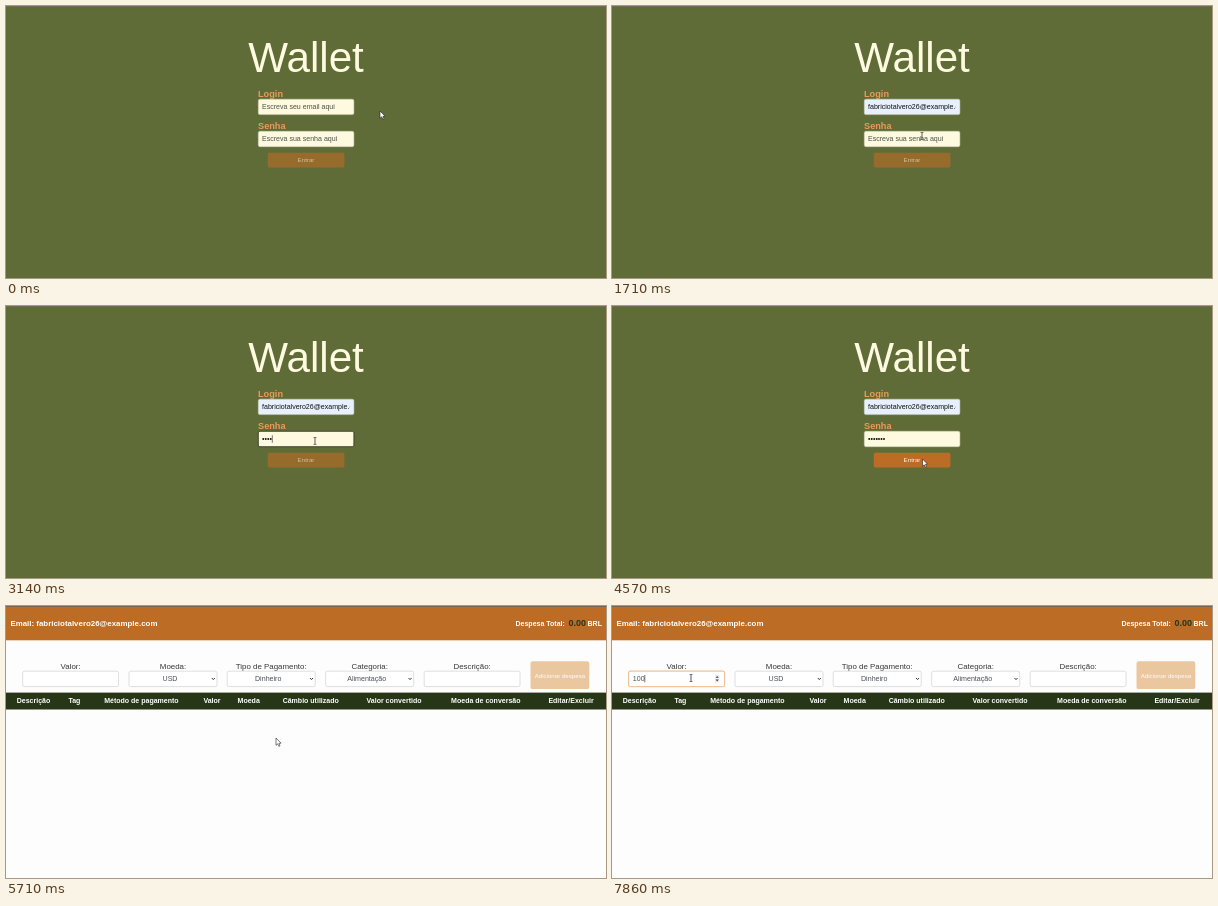
An HTML page with a canvas that plays this animation: 600 by 272 pixels, repeating every 8000 ms.

```html
<!DOCTYPE html>
<html lang="pt-BR">
<head>
<meta charset="utf-8">
<title>Wallet</title>
<style>
  html, body { margin: 0; width: 100%; height: 100%; overflow: hidden; background: #606c38; }
  canvas { display: block; width: 600px; height: 272px; }
</style>
</head>
<body>
<canvas id="stage"></canvas>
<script>
const W = 600, H = 272, LOOP = 8000, FPS = 7;
const EMAIL = 'fabriciotalvero26@example.com';
const OLIVE = '#606c38', FOREST = '#283618', CREAM = '#fefae0', SAND = '#dda15e', RUST = '#bc6c25';
const LOGIN_AT = 4710;

const canvas = document.getElementById('stage');
const ctx = canvas.getContext('2d');
const ratio = window.devicePixelRatio || 1;
canvas.width = W * ratio;
canvas.height = H * ratio;
ctx.scale(ratio, ratio);

// Pointer path: time, x, y
const path = [
  [0, 374, 105], [140, 371, 104], [860, 312, 101], [1290, 311, 101],
  [1710, 310, 130], [1860, 309, 134], [3430, 309, 135], [4000, 311, 155],
  [4300, 310.5, 153], [5140, 310.5, 153], [5710, 270, 132], [6430, 79, 72], [8000, 79, 72]
];

const ease = p => p * p * (3 - 2 * p);

function pointerAt(t) {
  const i = Math.max(1, path.findIndex(p => p[0] >= t));
  const [t0, x0, y0] = path[i - 1], [t1, x1, y1] = path[i];
  const p = ease((t - t0) / (t1 - t0));
  return [x0 + (x1 - x0) * p, y0 + (y1 - y0) * p];
}

function text(str, x, y, size, color, { bold = false, align = 'left' } = {}) {
  ctx.font = `${bold ? 'bold ' : ''}${size}px "Liberation Sans", Arial, sans-serif`;
  ctx.textAlign = align;
  ctx.fillStyle = color;
  ctx.fillText(str, x, y);
}

function rect(x, y, w, h, color) {
  ctx.fillStyle = color;
  ctx.fillRect(x, y, w, h);
}

function box(x, y, w, h, r, fill, stroke, line = 0.6) {
  ctx.beginPath();
  ctx.roundRect(x, y, w, h, r);
  ctx.fillStyle = fill;
  ctx.fill();
  if (!stroke) return;
  ctx.strokeStyle = stroke;
  ctx.lineWidth = line;
  ctx.stroke();
}

function poly(points, fill, stroke, line) {
  ctx.beginPath();
  points.forEach(([x, y]) => ctx.lineTo(x, y));
  ctx.closePath();
  ctx.fillStyle = fill;
  ctx.fill();
  if (!stroke) return;
  ctx.strokeStyle = stroke;
  ctx.lineWidth = line;
  ctx.stroke();
}

function arrow(x, y) {
  const shape = [[0, 0], [0, 7.3], [1.7, 5.8], [2.8, 8.3], [4, 7.8], [2.9, 5.3], [5.1, 5.2]];
  poly(shape.map(([a, b]) => [x + a, y + b]), '#fff', '#222', 0.6);
}

function beam(x, y) {
  rect(x - 0.4, y - 3.4, 0.8, 6.8, '#333');
  rect(x - 1.5, y - 3.7, 3, 0.7, '#444');
  rect(x - 1.5, y + 3, 3, 0.7, '#444');
}

const blink = (t, since) => (t - since) % 1000 < 500;
const caret = (x, y) => rect(x, y - 3.8, 0.6, 7.6, '#222');

function field(y, focused, fill) {
  box(252.3, y, 95.6, 15.4, 1.6, fill, focused ? '#2c2c22' : '#cfd0b8', focused ? 0.8 : 0.5);
}

function loginPage(t) {
  const filled = t >= 1290;
  const onLogin = t >= 860 && t < 2000;
  const onSenha = t >= 2000 && t < 4420;
  const dots = Math.max(0, Math.min(7, Math.floor((t - 2560) / 142.8) - (t > 3140 ? 1 : 0)));
  const ready = dots >= 6;

  rect(0, 0, W, H, OLIVE);
  rect(0, 0, W, 1, '#6a6e5b');
  text('Wallet', 300, 66, 42.2, CREAM, { align: 'center' });

  text('Login', 252, 90.6, 9.2, '#e69b59', { bold: true });
  field(93.2, onLogin && !filled, filled ? '#e8f0fe' : CREAM);
  ctx.save();
  ctx.beginPath();
  ctx.rect(253, 93, 91, 16);
  ctx.clip();
  if (filled) text(EMAIL, 256, 103.2, 7.05, '#111');
  else text('Escreva seu email aqui', 256, 103.2, 7.05, '#4f5148');
  ctx.restore();
  if (onLogin && !filled && blink(t, 860)) caret(256, 100.8);

  text('Senha', 252, 122.7, 9.2, '#e69b59', { bold: true });
  field(125.3, onSenha, CREAM);
  if (dots) text('•'.repeat(dots), 256, 135.3, 7.05, '#111');
  else text('Escreva sua senha aqui', 256, 135.3, 7.05, '#4f5148');
  const typing = t >= 2560 && t < 3700;
  if (onSenha && (typing || blink(t, dots ? 3700 : 2000))) caret(256 + dots * 2.47, 133);

  ctx.globalAlpha = ready ? 1 : 0.6;
  box(261.8, 146.8, 76.6, 14.8, 1.8, RUST);
  text('Entrar', 300, 156.4, 6.2, CREAM, { align: 'center' });
  ctx.globalAlpha = 1;
}

function chevron(x, y) {
  ctx.beginPath();
  ctx.moveTo(x - 1.5, y - 0.8);
  ctx.lineTo(x, y + 0.8);
  ctx.lineTo(x + 1.5, y - 0.8);
  ctx.strokeStyle = '#222';
  ctx.lineWidth = 0.9;
  ctx.stroke();
}

function spinner(x, y) {
  rect(x - 2.2, y - 3.8, 4.4, 7.6, '#ececec');
  poly([[x - 1.6, y - 0.9], [x, y - 2.8], [x + 1.6, y - 0.9]], '#444');
  poly([[x - 1.6, y + 0.9], [x, y + 2.8], [x + 1.6, y + 0.9]], '#444');
}

const inputs = [
  ['Valor:', 16.7, 95.8],
  ['Moeda:', 123, 88, 'USD'],
  ['Tipo de Pagamento:', 221.2, 88, 'Dinheiro'],
  ['Categoria:', 319.7, 88, 'Alimentação'],
  ['Descrição:', 418.2, 95.8]
];

const columns = [
  ['Descrição', 27.5], ['Tag', 68.4], ['Método de pagamento', 135.4],
  ['Valor', 206], ['Moeda', 242.7], ['Câmbio utilizado', 304.7],
  ['Valor convertido', 388], ['Moeda de conversão', 479.8], ['Editar/Excluir', 565]
];

function walletPage(t) {
  const focused = t >= 6420;
  const hovered = t >= 6280;

  rect(0, 0, W, H, '#fdfdfd');
  rect(0, 0, W, 34.3, RUST);
  rect(0, 0, W, 1, '#7a6350');
  text('Email: ' + EMAIL, 4.4, 19.8, 7.92, '#fff', { bold: true });
  text('Despesa Total:', 509.5, 19.7, 7.03, '#fff', { bold: true });
  text('0.00', 562.6, 20.1, 9, FOREST, { bold: true });
  text('BRL', 581.5, 19.7, 7.03, '#fff', { bold: true });

  for (const [label, x, w, value] of inputs) {
    const mid = x + w / 2;
    const active = focused && label === 'Valor:';
    text(label, mid, 62.7, 7.92, '#383838', { align: 'center' });
    if (active) box(x - 0.7, 64.5, w + 1.4, 16.8, 2.2, '#f3d9b9');
    box(x, 65.2, w, 15.4, 1.7, '#fff', active ? '#e3a766' : '#c6cbd0');
    if (value) {
      text(value, mid - 3, 75.3, 7.1, '#495057', { align: 'center' });
      chevron(x + w - 3.7, 72.8);
    }
  }

  if (hovered) spinner(105.2, 72.7);
  const typed = '100'.slice(0, t < 7280 ? 0 : t < 7560 ? 1 : t < 7850 ? 2 : 3);
  text(typed, 20.8, 75.3, 7.05, '#495057');
  if (focused && (typed || blink(t, 6420))) caret(20.8 + typed.length * 3.92, 72.7);

  box(524.5, 55.3, 58.8, 27.8, 2.2, '#ebc79f');
  text('Adicionar despesa', 553.9, 71.6, 6.15, '#fff', { align: 'center' });

  rect(0, 86.6, W, 16.9, FOREST);
  for (const [name, x] of columns) {
    text(name, x, 97.4, 7.03, '#fff', { bold: true, align: 'center' });
  }
}

function draw(now) {
  const step = Math.floor(((now % LOOP) + 5) * FPS / 1000);
  const t = Math.min(LOOP, Math.round(step * 100 / FPS) * 10);
  if (t < LOGIN_AT) loginPage(t);
  else walletPage(t);

  const [x, y] = pointerAt(t);
  const overText = t < LOGIN_AT
    ? x < 348 && ((y > 93 && y < 109) || (y > 125 && y < 141))
    : x < 112 && y < 81;
  (overText ? beam : arrow)(x, y);
  requestAnimationFrame(tick);
}

const start = performance.now();
function tick() {
  draw(performance.now() - start);
}
tick();
</script>
</body>
</html>
```
